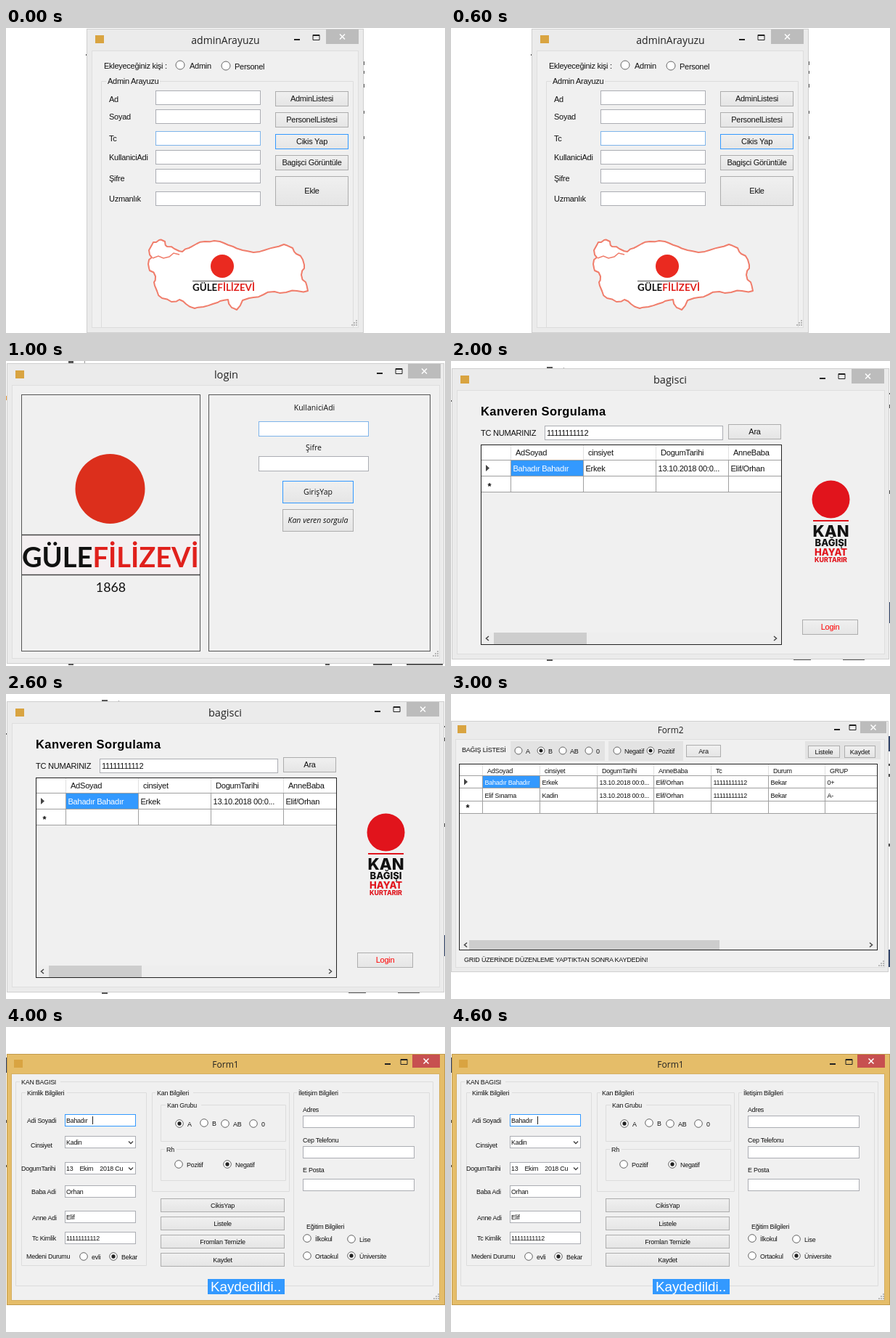
These frames come from a looping animation (605x420 px, 5 s). An HTML page:

```html
<!DOCTYPE html>
<html lang="tr">
<head>
<meta charset="utf-8">
<title>Form ekranları</title>
<style>
html, body { margin: 0; width: 100%; height: 100%; overflow: hidden; background: #fff; }
svg { display: block; width: 100vw; height: 100vh; }
text { white-space: pre; }
.ui { font-family: "Liberation Sans", Arial, sans-serif; letter-spacing: -.025em; }
.title, .soft { font-family: "Open Sans", "Noto Sans", sans-serif; letter-spacing: 0; }
.brand { font-family: Lato, sans-serif; letter-spacing: 0; }
.slogan { font-family: Inter, sans-serif; font-weight: 800; letter-spacing: 0; }
.heading { font-size: 16.5px; font-weight: 700; letter-spacing: .025em; }
.notice { font-size: 18.8px; letter-spacing: 0; }
</style>
</head>
<body>
<svg id="stage" viewBox="0 0 605 420" xmlns="http://www.w3.org/2000/svg"></svg>
<script>
const SCENE_MS = 1000;
const BLUE = '#3399ff', GREY = '#adadad', FACE = '#f0f0f0', RED = '#dc2f1c', SLOGAN_RED = '#e1141c';

const attrs = o => Object.entries(o).map(([k, v]) => `${k}="${v}"`).join(' ');
const fill = (x, y, w, h, color) => `<rect x="${x}" y="${y}" width="${w}" height="${h}" fill="${color}"/>`;
const box = (x, y, w, h, color, stroke) =>
  `<rect x="${x + .5}" y="${y + .5}" width="${w - 1}" height="${h - 1}" fill="${color}" stroke="${stroke}"/>`;
const line = (d, stroke = '#000', width = 1) =>
  `<path d="${d}" fill="none" stroke="${stroke}" stroke-width="${width}"/>`;
const disc = (x, y, r, color) => `<circle cx="${x}" cy="${y}" r="${r}" fill="${color}"/>`;
const text = (x, y, s, o = {}) => `<text x="${x}" y="${y}" ${attrs(o)}>${s}</text>`;
const mid = (x, y, s, o = {}) => text(x, y, s, { 'text-anchor': 'middle', ...o });
const labels = rows => rows.map(([x, y, s]) => text(x, y, s)).join('');

const input = (x, y, w, h, stroke = '#abadb3') => box(x, y, w, h, '#fff', stroke);

function button(x, y, w, h, label, { stroke = GREY, size = 11, ...style } = {}) {
  return box(x, y, w, h, 'url(#face)', stroke) +
    mid(x + w / 2, y + h / 2 + size * .36, label, { 'font-size': size, ...style });
}

function radio(x, y, label, { on = false, r = 5.5, gap = 12, dy = 4 } = {}) {
  return `<circle cx="${x}" cy="${y}" r="${r}" fill="#fff" stroke="#666"/>` +
    (on ? disc(x, y, r * .5, '#222') : '') + text(x + gap, y + dy, label);
}

function group(x, y, right, bottom, label, labelX, labelWidth) {
  return line(`M${labelX - 2} ${y + .5}H${x + .5}V${bottom + .5}H${right + .5}V${y + .5}H${labelX + labelWidth + 2}`, '#dcdcdc') +
    text(labelX, y + 4, label);
}

function grip(x, y) {
  let dots = '';
  for (let row = 0; row < 3; row++)
    for (let col = 2 - row; col < 3; col++) dots += fill(x + col * 3, y + row * 3, 2, 2, '#b8b8b8');
  return dots;
}

// Window frame; the client area is [x, y, right, bottom].
function frame({ at: [x, y, r, b], client: [cx, cy, cr, cb], title, titleX, titleY, titleSize,
                 icon, buttons: [minX, maxX, buttonY], close, active }) {
  const [closeX, closeY, closeW, closeH] = close;
  const mx = closeX + closeW / 2, my = closeY + closeH / 2;
  return box(x, y, r - x, b - y, active ? '#e5bd69' : '#ebebeb', active ? '#c29a4c' : '#cfcfcf') +
    box(cx, cy, cr - cx, cb - cy, FACE, active ? '#d5af62' : '#dedede') +
    fill(icon[0], icon[1], 12, 11, '#d9a441') +
    mid(titleX, titleY, title, { class: 'title', 'font-size': titleSize, fill: '#222' }) +
    fill(minX, buttonY + 6, 8, 2, '#222') +
    line(`M${maxX} ${buttonY + .5}h9v7h-9z`, '#222') + fill(maxX, buttonY, 9, 2, '#222') +
    fill(...close, active ? '#c75050' : '#bcbcbc') +
    line(`M${mx - 3.5} ${my - 3.5}l7 7m0 -7l-7 7`, '#fff', 1.5);
}

function grid({ at: [x, y, r, b], cols, rows, heads, cells, scrollY, thumb }) {
  const first = rows[0], last = rows[rows.length - 1];
  const baseline = (top, bottom) => (top + bottom) / 2 + 4.5;
  let s = box(x, y, r - x, b - y, FACE, '#222') + fill(x + 1, y + 1, r - x - 2, last - y - 1, '#fff');
  rows.forEach(v => s += line(`M${x + 1} ${v + .5}H${r - 1}`, '#a0a0a0'));
  cols.forEach(v => s += line(`M${v + .5} ${y + 1}V${first}`, '#e0e0e0') +
    line(`M${v + .5} ${first}V${last}`, '#a0a0a0'));
  s += fill(cols[0] + 1, first + 1, cols[1] - cols[0] - 1, rows[1] - first - 1, BLUE);
  heads.forEach((h, i) => s += text(cols[i] + 7, baseline(y, first), h));
  cells.forEach((row, j) => row.forEach((c, i) =>
    s += text(cols[i] + 3.5, baseline(rows[j], rows[j + 1]), c, i + j ? {} : { fill: '#fff' })));
  const middle = (first + rows[1]) / 2 + .5;
  s += `<path d="M${x + 7} ${middle - 4.5}l5 4.5l-5 4.5z" fill="#444"/>` +
    mid(x + 12, last - 3, '*', { 'font-size': 13, 'font-weight': 700 });
  const sh = b - scrollY - 1, sy = scrollY + sh / 2;
  return s + fill(x + 1, scrollY, r - x - 2, sh, '#eee') +
    fill(thumb[0], scrollY, thumb[1] - thumb[0], sh, '#cdcdcd') +
    line(`M${x + 11} ${sy - 3}l-3.5 3l3.5 3M${r - 11} ${sy - 3}l3.5 3l-3.5 3`, '#444', 1.5);
}

// Slivers of the desktop showing past the window edges.
const ticks = list => list.map(([x, y, w, h]) => fill(x, y, w, h, '#555')).join('');

const wordmark = (x, y, size) =>
  `<text x="${x}" y="${y}" class="brand" font-size="${size}" font-weight="700">GÜLE<tspan fill="#e0201c">FİLİZEVİ</tspan></text>`;

function coast() {
  const points = [[203, 295], [211, 292], [219, 294], [222, 301], [232, 304], [243, 308], [252, 303], [263, 297],
    [274, 294], [287, 293], [300, 296], [313, 301], [326, 306], [341, 309], [356, 306], [370, 302], [383, 298],
    [395, 303], [400, 311], [409, 319], [411, 331], [407, 340], [413, 350], [416, 362], [401, 362], [386, 364],
    [370, 363], [355, 367], [341, 371], [326, 375], [318, 388], [311, 385], [306, 374], [295, 376], [285, 380],
    [272, 384], [260, 386], [248, 380], [239, 374], [228, 377], [215, 372], [208, 362], [204, 350], [206, 342],
    [198, 334], [196, 325], [201, 316], [197, 306]];
  const path = points.map(([x, y], i) => {
    const [nx, ny] = points[(i + 1) % points.length];
    return `${x} ${y} ${(x + nx) / 2 + 1.5 * Math.sin(i * 5)} ${(y + ny) / 2 + 1.5 * Math.cos(i * 3)}`;
  }).join(' ');
  return `<path d="M${path}z" fill="#fff" stroke="#f07d6b" stroke-width="2" stroke-linejoin="round"/>` +
    line('M202 317l8 -3l7 3l8 -2l6 -5l8 2', '#f07d6b', 1.6);
}

function adminForm() {
  const fields = [['Ad', 86, 102], ['Soyad', 112, 126], ['Tc', 142, 156], ['KullaniciAdi', 168, 182],
    ['Şifre', 194, 211], ['Uzmanlık', 225, 239]];
  const buttons = [['AdminListesi', 87, 21], ['PersonelListesi', 116, 21], ['Cikis Yap', 146, 21],
    ['Bagişci Görüntüle', 175, 21], ['Ekle', 204, 41]];
  return ticks([[492, 46, 2, 5], [492, 59, 2, 4], [492, 77, 2, 5], [492, 114, 2, 4], [492, 149, 2, 4], [110, 36, 1, 2]]) +
    frame({ at: [111, 1, 493, 420], client: [118, 31, 486, 413], title: 'adminArayuzu', titleX: 302.5, titleY: 22,
      titleSize: 14, icon: [123, 10], buttons: [397, 423, 9], close: [441, 2, 45, 20] }) +
    text(135, 56, 'Ekleyeceğiniz kişi :') + radio(240, 51, 'Admin', { r: 6, gap: 13, dy: 5 }) +
    radio(303, 52, 'Personel', { r: 6, dy: 5 }) +
    group(131, 73, 478, 412, 'Admin Arayuzu', 140, 70) +
    fields.map(([s, y, ty], i) => text(142, ty, s) + input(206, y, 145, 20, i === 2 ? '#7eb4ea' : undefined)).join('') +
    buttons.map(([s, y, h], i) => button(371, y, 101, h, s, i === 2 ? { stroke: BLUE } : {})).join('') +
    coast() + disc(298, 328, 16, '#ea2a20') + line('M257 348.5H341', '#777', 1.5) +
    wordmark(257, 362, 13.4) + grip(476, 402);
}

function loginForm() {
  const label = { class: 'soft', 'font-size': 10.5 }, soft = { class: 'soft', size: 10.5 };
  return ticks([[86, 0, 7, 3], [86, 417, 7, 2], [440, 417, 6, 2], [506, 417, 26, 2], [552, 417, 50, 2]]) +
    line('M108.5 0V3', '#999') + fill(0, 48, 2, 6, '#f0a040') +
    frame({ at: [1, 3, 604, 417], client: [8, 33, 598, 410], title: 'login', titleX: 303.5, titleY: 24,
      titleSize: 14.6, icon: [13, 13], buttons: [511, 537, 10], close: [554, 4, 45, 20] }) +
    box(21, 46, 247, 354, FACE, '#555') + box(279, 46, 306, 354, FACE, '#555') +
    disc(143.5, 176, 48, RED) + fill(22, 240, 245, 54, '#f4eff1') +
    line('M22 239.5H268M22 294.5H268', '#444', 1.3) + wordmark(22, 284, 38) +
    mid(144.5, 317.5, '1868', { class: 'brand', 'font-size': 17.8 }) +
    mid(425, 68, 'KullaniciAdi', label) + input(348, 83, 152, 21, '#7eb4ea') +
    mid(424, 123, 'Şifre', label) + input(348, 131, 152, 21) +
    button(381, 165, 98, 31, 'GirişYap', { ...soft, stroke: BLUE }) +
    button(381, 204, 98, 31, 'Kan veren sorgula', { ...soft, 'font-style': 'italic' }) + grip(588, 399);
}

function donorForm() {
  const slogan = (y, s, size, color) => mid(523.5, y, s, { class: 'slogan', 'font-size': size, fill: color });
  return ticks([[132, 8, 8, 2], [132, 411, 8, 2], [472, 411, 24, 1], [540, 411, 30, 1], [0, 54, 1, 2],
      [603, 44, 2, 2], [603, 60, 2, 5], [603, 178, 2, 5]]) +
    line('M155.5 9V11', '#999') + fill(603, 332, 2, 29, '#33456b') +
    frame({ at: [1, 10, 604, 411], client: [8, 40, 598, 404], title: 'bagisci', titleX: 302, titleY: 31,
      titleSize: 14.5, icon: [13, 20], buttons: [508, 534, 17], close: [552, 11, 45, 20] }) +
    text(41, 75, 'Kanveren Sorgulama', { class: 'heading', fill: '#000' }) +
    text(41, 103, 'TC NUMARINIZ') + input(129, 89, 246, 20) + text(132, 103, '11111111112') +
    button(382, 87, 73, 21, 'Ara') +
    grid({ at: [41, 115, 456, 391], cols: [82, 182, 282, 382], rows: [136, 158, 180],
      heads: ['AdSoyad', 'cinsiyet', 'DogumTarihi', 'AnneBaba'],
      cells: [['Bahadır Bahadır', 'Erkek', '13.10.2018 00:0...', 'Elif/Orhan']],
      scrollY: 374, thumb: [59, 187] }) +
    disc(523.5, 190.5, 26, SLOGAN_RED) + fill(499, 219, 49, 2, SLOGAN_RED) +
    slogan(242, 'KAN', 22, '#111') + slogan(255, 'BAĞIŞI', 13, '#111') +
    slogan(268, 'HAYAT', 13, SLOGAN_RED) + slogan(276.5, 'KURTARIR', 8.8, SLOGAN_RED) +
    button(484, 356, 77, 21, 'Login', { fill: '#f00' });
}

function listForm() {
  const small = { size: 9.2 }, dot = { r: 5, gap: 10, dy: 4 };
  return ticks([[603, 96, 2, 3], [603, 110, 2, 4], [603, 206, 2, 4]]) +
    fill(603, 58, 2, 21, '#33456b') + fill(603, 352, 2, 24, '#33456b') +
    frame({ at: [0, 37, 603, 383], client: [6, 62, 598, 377], title: 'Form2', titleX: 302.5, titleY: 54,
      titleSize: 11.8, icon: [9, 43], buttons: [528, 549, 42], close: [564, 38, 36, 16] }) +
    fill(82, 65, 130, 27, '#e3e3e3') + fill(217, 65, 103, 27, '#e3e3e3') + fill(488, 65, 104, 25, '#e3e3e3') +
    text(15, 80, 'BAĞIŞ LİSTESİ') +
    [[93, 'A'], [124, 'B'], [154, 'AB'], [190, '0'], [229, 'Negatif'], [275, 'Pozitif']]
      .map(([x, s], i) => radio(x, 78, s, { ...dot, on: i === 1 || i === 5 })).join('') +
    button(324, 70, 48, 17, 'Ara', small) + button(492, 71, 44, 17, 'Listele', small) +
    button(542, 71, 43, 17, 'Kaydet', small) +
    grid({ at: [11, 96, 588, 353], cols: [43, 122, 201, 279, 358, 437, 515], rows: [112, 129, 147, 164],
      heads: ['AdSoyad', 'cinsiyet', 'DogumTarihi', 'AnneBaba', 'Tc', 'Durum', 'GRUP'],
      cells: [['Bahadır Bahadır', 'Erkek', '13.10.2018 00:0...', 'Elif/Orhan', '11111111112', 'Bekar', '0+'],
        ['Elif Sınama', 'Kadin', '13.10.2018 00:0...', 'Elif/Orhan', '11111111112', 'Bekar', 'A-']],
      scrollY: 339, thumb: [25, 370] }) +
    text(18, 369, 'GRID ÜZERİNDE DÜZENLEME YAPTIKTAN SONRA KAYDEDİN!') + grip(589, 367);
}

function donationForm() {
  const fields = [[120, 'Bahadır'], [150, 'Kadin'], [186, '13    Ekim    2018 Cu'], [218, 'Orhan'], [253, 'Elif'], [282, '11111111112']];
  const arrow = y => line(`M169 ${y}l3 3l3 -3`, '#444', 1.4);
  const dot = { r: 5.3, gap: 11 };
  return ticks([[0, 128, 1, 4], [0, 190, 1, 3]]) + fill(0, 42, 1, 21, '#33456b') + fill(603, 352, 2, 24, '#33456b') +
    frame({ at: [1, 37, 605, 383], client: [7, 64, 598, 377], title: 'Form1', titleX: 302.5, titleY: 56,
      titleSize: 12, icon: [11, 45], buttons: [522, 544, 44], close: [560, 38, 38, 18], active: true }) +
    group(13, 75, 588, 356, 'KAN BAGISI', 21, 52) +
    group(21, 90, 193, 328, 'Kimlik Bilgileri', 29, 53) +
    group(201, 90, 390, 226, 'Kan Bilgileri', 208, 48) +
    group(213, 107, 385, 157, 'Kan Grubu', 222, 45) +
    group(213, 168, 385, 211, 'Rh', 221, 12) +
    group(396, 90, 583, 329, 'İletişim Bilgileri', 403, 58) +
    labels([[29, 132, 'Adi Soyadi'], [34, 166, 'Cinsiyet'], [21, 198, 'DogumTarihi'], [35, 230, 'Baba Adi'],
      [36, 266, 'Anne Adi'], [36, 294, 'Tc Kimlik'], [28, 319, 'Medeni Durumu'], [409, 117, 'Adres'],
      [409, 159, 'Cep Telefonu'], [409, 200, 'E Posta'], [414, 278, 'Eğitim Bilgileri']]) +
    fields.map(([y, s], i) => input(81, y, 98, 17, i ? undefined : BLUE) + text(83, y + 12, s)).join('') +
    fill(119, 123, 1, 11, '#222') + fill(166, 187, 12, 15, '#fff') + arrow(157.5) + arrow(193.5) +
    radio(107, 316, 'evli', dot) + radio(148, 316, 'Bekar', { ...dot, on: true }) +
    radio(239, 133, 'A', { ...dot, on: true }) + radio(273, 132, 'B', dot) + radio(302, 133, 'AB', dot) +
    radio(341, 133, '0', dot) + radio(238, 189, 'Pozitif', dot) + radio(305, 189, 'Negatif', { ...dot, on: true }) +
    ['CikisYap', 'Listele', 'Fromlan Temizle', 'Kaydet']
      .map((s, i) => button(213, 236 + i * 25, 171, 19, s, { size: 9 })).join('') +
    [122, 164, 209].map(y => input(409, y, 154, 17)).join('') +
    radio(415, 291, 'İlkokul', dot) + radio(476, 292, 'Lise', dot) +
    radio(415, 315, 'Ortaokul', dot) + radio(476, 315, 'Üniversite', { ...dot, on: true }) +
    fill(278, 347, 106, 21, BLUE) +
    text(282, 364, 'Kaydedildi..', { class: 'notice', fill: '#fff' }) + grip(589, 367);
}

const forms = [[adminForm, 11], [loginForm, 10.5], [donorForm, 11.1], [listForm, 9], [donationForm, 8.9]];
const stage = document.getElementById('stage');
stage.innerHTML = `<defs><linearGradient id="face" x2="0" y2="1">
  <stop stop-color="#f0f0f0"/><stop offset="1" stop-color="#e5e5e5"/></linearGradient></defs>` +
  forms.map(([draw, size]) => `<g class="ui" font-size="${size}" fill="#111" display="none">${draw()}</g>`).join('');
const scenes = [...stage.querySelectorAll('g')];

const start = performance.now();
function update(now) {
  const current = Math.floor(Math.max(0, now - start) / SCENE_MS) % scenes.length;
  scenes.forEach((scene, i) => scene.setAttribute('display', i === current ? 'inline' : 'none'));
  requestAnimationFrame(update);
}
update(start);
</script>
</body>
</html>
```
